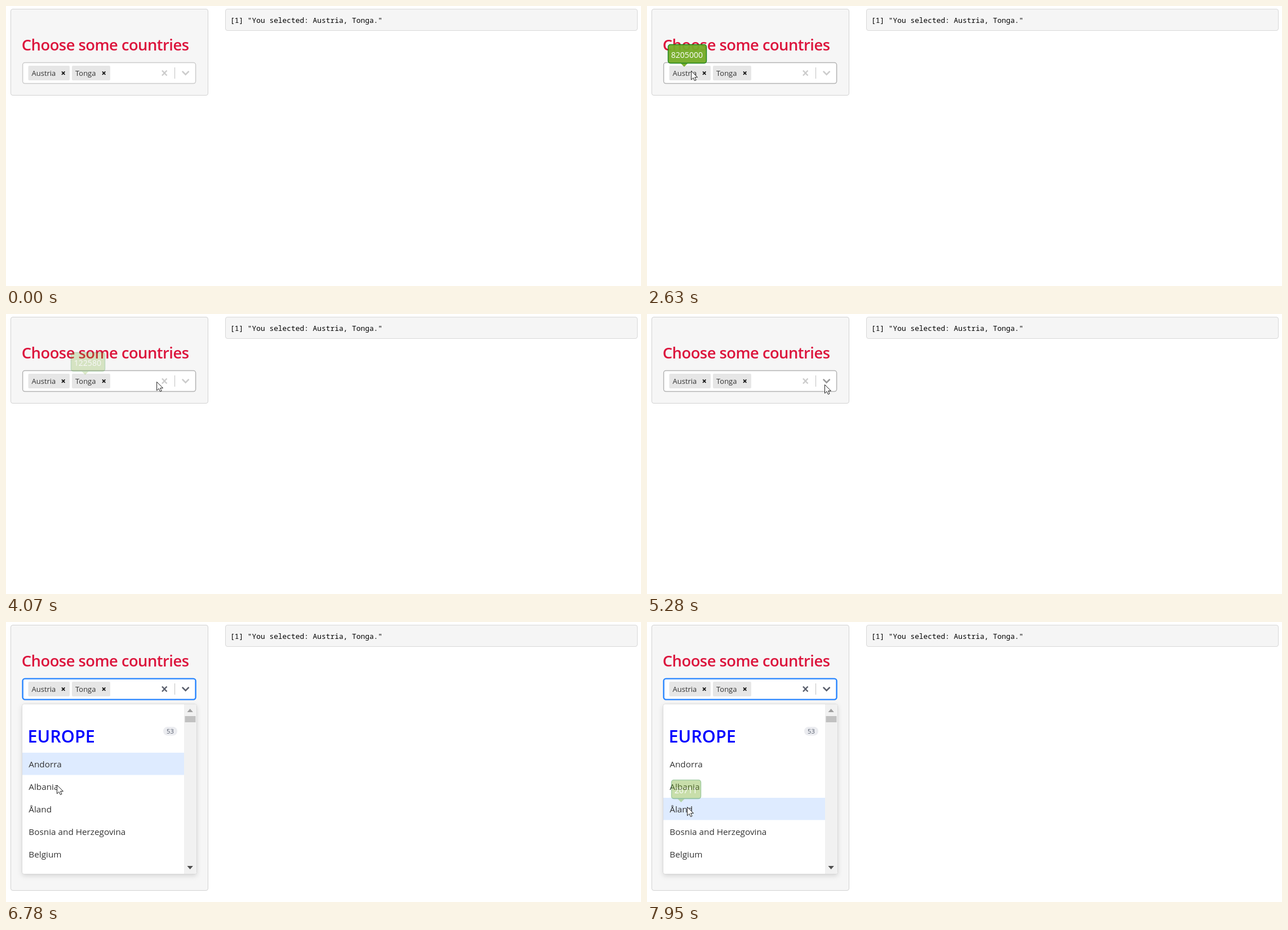
These frames come from a looping animation (1127 px wide and 497 px high, 8 s). An HTML page:

```html
<!DOCTYPE html>
<html lang="en">
<head>
<meta charset="utf-8">
<title>Country select</title>
<style>
  html, body { margin: 0; height: 100%; overflow: hidden; background: #fff; }
  svg { display: block; font-family: "Open Sans", "Noto Sans", sans-serif; fill: #333; }
  .heading { font-size: 27.4px; font-weight: 600; fill: #dc143c; letter-spacing: -.54px; }
  .output { font: 12.86px "Noto Sans Mono", monospace; fill: #000; white-space: pre; }
  .tag { font-size: 13px; }
  .option { font-size: 15.3px; }
  .group { font-size: 30.6px; font-weight: 600; fill: #00f; }
  .count { font-size: 11.2px; fill: #555c6c; }
  .tip text { font-size: 14.1px; fill: #fff; }
  .line { fill: none; }
  #menu { filter: drop-shadow(0 3px 4px #0002); }
</style>
</head>
<body>
<svg width="1127" height="497" viewBox="0 0 1127 497">
  <defs>
    <clipPath id="list"><rect x="29" y="146" width="309" height="301" rx="4"/></clipPath>
  </defs>
  <rect id="panel" x="8.5" y="5.5" width="350" height="153" rx="3.5" fill="#f6f6f6" stroke="#d2d2d2"/>
  <rect x="389.5" y="5.5" width="731" height="38" rx="3.5" fill="#f5f5f5" stroke="#d8d8d8"/>
  <text class="output" x="398" y="30">[1] "You selected: Austria, Tonga."</text>
  <text class="heading" x="27.8" y="79">Choose some countries</text>
  <rect id="control" x="29.6" y="100.6" width="307" height="37" rx="4" fill="#fff"/>
  <g id="tags"></g>
  <path id="clear" class="line" d="M277 114.5l8.5 9m0-9l-8.5 9" stroke-width="2.5"/>
  <path class="line" d="M299.5 109v20" stroke="#ccc" stroke-width="1.3"/>
  <path id="chevron" class="line" d="M313.5 116.5l5.2 5.2 5.2-5.2" stroke-width="2.5" stroke-linecap="round"/>
  <path id="caret" class="line" d="M189 109v21" stroke="#333"/>
  <g id="menu">
    <rect x="28.5" y="145.5" width="310" height="302" rx="4" fill="#fff" stroke="#0000001a"/>
    <g clip-path="url(#list)">
      <rect id="highlight" x="29" width="287" height="39.5" fill="#deebff"/>
      <text class="group" x="38.5" y="214">EUROPE</text>
      <rect x="279" y="186" width="25" height="15.5" rx="7.7" fill="#ebecf0"/>
      <text class="count" x="285" y="198">53</text>
      <g id="options"></g>
      <rect x="316" y="146" width="22" height="301" fill="#f1f1f1"/>
      <rect x="317.5" y="167" width="19" height="11" fill="#c1c1c1"/>
      <path d="M321.5 160l5.2-6 5.2 6z" fill="#a0a0a0"/>
      <path d="M321.5 433l5.2 6 5.2-6z" fill="#505050"/>
    </g>
  </g>
  <g id="tips"></g>
  <g id="cursor" fill="#fff" stroke="#222" stroke-linejoin="round">
    <path id="arrow" d="M.5 .5v15.3l3.6-3.4 2.4 5.2 2.5-1.1-2.3-5.1h4.8z"/>
    <path id="hand" d="M-1.5 1.5q1.5-2.5 3 0v5.5q2-1.2 2.8.4 2-1 2.7.7 2-.6 2 1.6v4q0 2-1.5 3.6v1.7h-7.6v-1.7q-2-3-5-6.8-.2-2.3 1.8-1.6l1.8 1.5z"/>
  </g>
</svg>
<script>
const LOOP = 8000, OPEN = 5480, FADE = 150;
const $ = id => document.getElementById(id);
const set = (id, attrs) => { for (const k in attrs) $(id).setAttribute(k, attrs[k]); };
const show = (id, on) => { $(id).style.display = on ? '' : 'none'; };

// Selected tags: label, left edge, width, left edge of the remove button
const tags = [['Austria', 39.5, 73.5, 90.5], ['Tonga', 117, 68, 162.5]];
$('tags').innerHTML = tags.map(([name, x, w, bx], i) =>
  `<rect x="${x}" y="106" width="${w}" height="26" rx="2" fill="#e6e6e6"/>
   <rect id="remove${i}" x="${bx}" y="106" width="22.5" height="26" rx="2" fill="#ffbdad"/>
   <text class="tag" x="${x + 6}" y="124">${name}</text>
   <path id="cross${i}" class="line" d="M${bx + 8.5} 116.3l5.4 5.6m0-5.6l-5.4 5.6" stroke-width="1.7"/>`).join('');

$('options').innerHTML = ['Andorra', 'Albania', 'Åland', 'Bosnia and Herzegovina', 'Belgium', 'Bulgaria']
  .map((name, i) => `<text class="option" x="40.3" y="${258 + 40 * i}">${name}</text>`).join('');

// Population tooltips: value, left, top, arrow x, shown from, hidden from
const tips = [
  ['8205000', 37, 68, 66, 1850, 2720],
  ['122580', 115, 68, 140.5, 3060, 3960],
  ['2986952', 42, 240, 67, 6950, 7560],
  ['26711', 43, 280, 60.5, 7890, 9000],
];
$('tips').innerHTML = tips.map(([value, x, y, ax], i) => {
  const w = 8 * value.length + 12;
  return `<g id="tip${i}" class="tip">
    <path d="M${ax - 6} ${y + 34}h12l-6 6z" fill="#74ac26"/>
    <rect x="${x + .5}" y="${y + .5}" width="${w}" height="33" rx="4" fill="#74ac26" stroke="#148014" stroke-width="1.5"/>
    <text x="${x + 5.7}" y="${y + 24}">${value}</text></g>`;
}).join('');

// Pointer path: time, x, y
const path = [
  [790, 416, 8], [930, 330, 36], [1330, 330, 36], [1680, 91, 121], [1800, 86, 118], [2100, 77.5, 115],
  [2300, 78, 115], [2630, 78, 115], [2900, 104, 117], [3400, 143, 117], [3730, 143, 117],
  [4070, 267, 120], [4490, 318, 121], [4690, 318, 121], [4691, 316, 123], [4950, 316, 123],
  [5020, 315, 125], [6010, 315, 125], [6780, 90, 289], [7200, 88, 292], [7460, 88, 292], [7950, 71, 328],
];
function pointer(t) {
  const i = path.findIndex(p => p[0] > t);
  if (i < 0) return path.at(-1).slice(1);
  if (i === 0) return [-50, -50];
  const [t0, x0, y0] = path[i - 1], [t1, x1, y1] = path[i];
  const k = (t - t0) / (t1 - t0);
  return [x0 + (x1 - x0) * k, y0 + (y1 - y0) * k];
}

const clamp = v => Math.max(0, Math.min(1, v));

function draw(t) {
  const [x, y] = pointer(t), open = t >= OPEN;
  const over = (x0, x1, y0 = 100, y1 = 138) => x >= x0 && x <= x1 && y >= y0 && y <= y1;

  set('panel', { height: open ? 471 : 153 });
  set('control', open
    ? { stroke: '#2684ff', 'stroke-width': 2.4 }
    : { stroke: over(29, 337) ? '#b3b3b3' : '#ccc', 'stroke-width': 1.5 });
  set('clear', { stroke: open ? '#5a5f6c' : over(268, 299) ? '#aaa' : '#ccc' });
  set('chevron', { stroke: open ? '#5a5f6c' : over(300, 337) ? '#999' : '#ccc' });

  let onRemove = false;
  tags.forEach(([, , , bx], i) => {
    const hover = over(bx, bx + 22.5, 106, 132);
    show('remove' + i, hover);
    set('cross' + i, { stroke: hover ? '#6b3226' : '#111' });
    onRemove ||= hover;
  });

  show('menu', open);
  show('caret', open && (t - 5180) % 1000 < 500);
  set('highlight', { y: 232 + 40 * (t < 6850 ? 0 : y < 312 ? 1 : 2) });
  tips.forEach(([, , , , from, to], i) =>
    set('tip' + i, { opacity: .95 * Math.min(clamp((t - from) / FADE), clamp(1 - (t - to) / FADE)) }));

  set('cursor', { transform: `translate(${x} ${y})` });
  show('arrow', !onRemove);
  show('hand', onRemove);
}

function tick() {
  draw(performance.now() % LOOP);
  requestAnimationFrame(tick);
}
tick();
</script>
</body>
</html>
```
